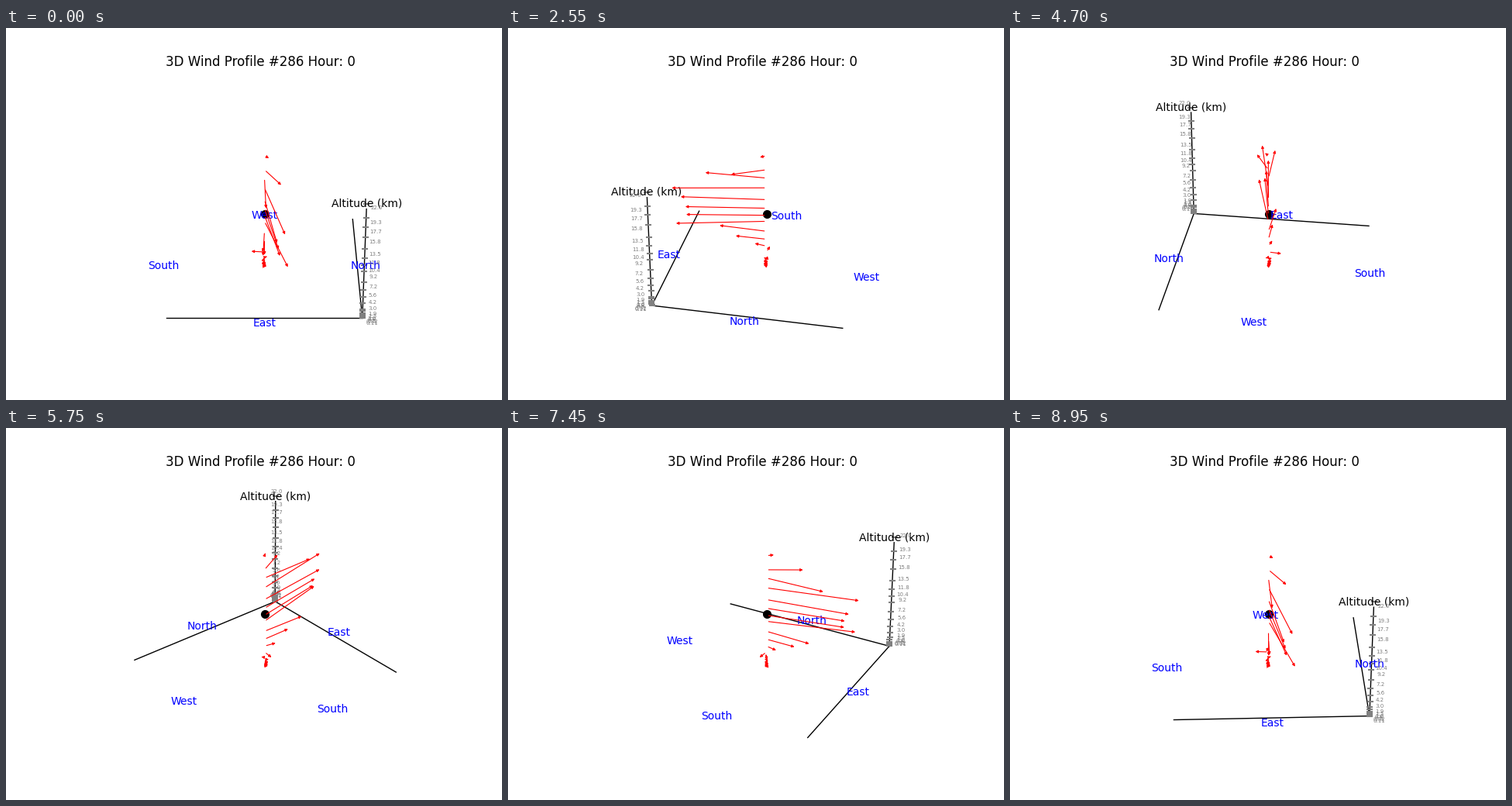
These frames come from a looping animation (640 px wide and 480 px high, 9000 ms). A matplotlib script:

```python
import numpy as np
import matplotlib.pyplot as plt
from matplotlib.animation import FuncAnimation
from matplotlib.patches import FancyArrowPatch

W, H = 640, 480
FRAMES, INTERVAL = 180, 50
ELEV = np.radians(30)
DIST = 10
SCALE = 369.6 / 0.185          # pixels per unit on the view plane
CX, CY = 333.5, 237.4
UNIT = 0.556
AXIS, LABEL = 1.1 * UNIT, 1.2 * UNIT

PRESSURES = [*range(1000, 875, -25), 850, 800, *range(700, 300, -100),
             *range(300, 50, -50), 70, 50, 30]      # hPa


def altitude(pressure):
    """Height in km from the barometric formula, rounded for display."""
    km = 44.33 * (1 - (pressure / 1013.25) ** 0.19026)
    return round(km, 2 if km < 0.5 else 1 if km < 20 else 0)


ALTS = np.array([altitude(p) for p in PRESSURES])
LOW, HIGH = ALTS[0], ALTS[-1]

# wind components, linear between a few key altitudes
EAST = np.interp(
    ALTS, [0, 1.5, 1.9, 3, 5.6, 7.2, 9.2, 10.7, 15.8, 17.7, 19.3, 22],
    [.02, .02, -.02, -.01, .22, .33, .58, .51, .606, .413, .218, .047])
NORTH = np.interp(
    ALTS, [0, 1.5, 1.9, 3, 4.2, 5.6, 7.2, 9.2, 10.4, 13.5, 15.8, 17.7, 19.3, 22],
    [-.01, -.02, .03, -.1, -.02, 0, -.01, .15, .1, .08, .13, .01, .114, .04])


def project(x, y, alt, azim):
    """Perspective view of a point, in pixels from the top left."""
    z = (alt - (LOW + HIGH) / 2) * 0.8229 / (HIGH - LOW)
    side = -x * np.sin(azim) + y * np.cos(azim)
    near = x * np.cos(azim) + y * np.sin(azim)
    depth = DIST - near * np.cos(ELEV) - z * np.sin(ELEV)
    up = z * np.cos(ELEV) - near * np.sin(ELEV)
    return CX + SCALE * side / depth, CY - SCALE * up / depth


fig = plt.figure(figsize=(W / 100, H / 100), dpi=100)
ax = fig.add_axes([0, 0, 1, 1])
ax.set_xlim(0, W)
ax.set_ylim(H, 0)
ax.axis("off")

ax.text(328, 49.3, "3D Wind Profile #286 Hour: 0", fontsize=12, ha="center")

corner = (AXIS, AXIS, LOW)
ends = [(-AXIS, AXIS, LOW), (AXIS, -AXIS, LOW), (AXIS, AXIS, HIGH - 1)]
edges = [ax.plot([], [], color="black", lw=1)[0] for _ in ends]
ticks, = ax.plot([], [], "_", color="gray", ms=6, mew=1.5)
ax.plot(*project(0, 0, 10.64, 0), "o", color="black", ms=7)

labels = []


def add_label(text, pos, color, size=10):
    item = ax.text(0, 0, text, color=color, fontsize=size,
                   ha="center", va="center")
    labels.append((item, pos))


for k, name in enumerate(["East", "North", "West", "South"]):
    turn = k * np.pi / 2
    add_label(name, (LABEL * np.cos(turn), LABEL * np.sin(turn), LOW), "blue")
add_label("Altitude (km)", (AXIS, AXIS, HIGH), "black")
for alt in ALTS:
    add_label(str(alt), (LABEL, LABEL, alt), "gray", 5)

arrows = [
    ax.add_patch(FancyArrowPatch((0, 0), (1, 1), arrowstyle="-|>", color="red",
                                 mutation_scale=5, lw=0.8, zorder=4))
    for _ in ALTS
]


def update(i):
    azim = 2 * np.pi * i / FRAMES
    for line, end in zip(edges, ends):
        line.set_data(*zip(project(*corner, azim), project(*end, azim)))
    ticks.set_data(*project(AXIS, AXIS, ALTS, azim))
    for item, pos in labels:
        item.set_position(project(*pos, azim))
    for arrow, east, north, alt in zip(arrows, EAST, NORTH, ALTS):
        arrow.set_positions(project(0, 0, alt, azim),
                            project(east, north, alt, azim))
    return []


anim = FuncAnimation(fig, update, frames=FRAMES, interval=INTERVAL, repeat=True)
plt.show()
```
